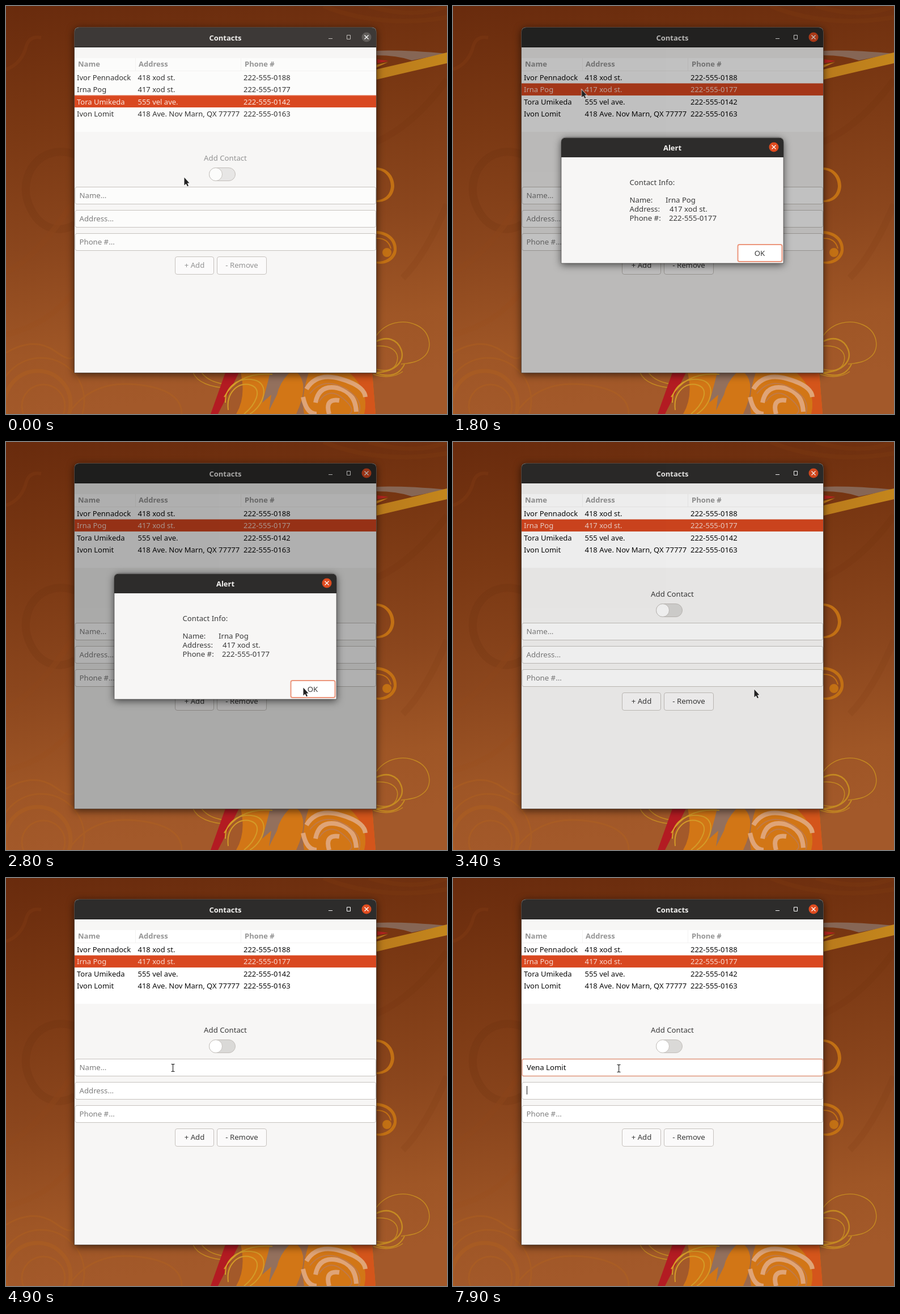
An HTML page for the animation above (8000 ms loop, 778 by 720 pixels).

```html
<!DOCTYPE html>
<html lang="en">
<head>
<meta charset="utf-8">
<title>Contacts</title>
<style>
@property --active { syntax: "<percentage>"; inherits: true; initial-value: 0%; }
@property --picked { syntax: "<percentage>"; inherits: true; initial-value: 0%; }

html, body { margin: 0; width: 100%; height: 100%; overflow: hidden; background: #83401a; }
svg { position: absolute; left: 0; top: 0; display: block; }
svg, .typed { font: 500 13.2px "Noto Sans", "Open Sans", sans-serif; }
svg text { white-space: pre; }
svg, svg *, .typed, .typed * { animation: 8s step-end infinite; }

/* window focus state */
#scene { animation-name: activate, pick; }
.bar { fill: color-mix(in srgb, #2d2c2b var(--active), #3d3937); }
.title { font-weight: 700; font-size: 13px; fill: #f3f2f0; text-anchor: middle; }
.icon { fill: none; stroke: color-mix(in srgb, #fff var(--active), #c3bfbb); }
.close { fill: color-mix(in srgb, #df4b1f var(--active), #605c59); }
.cross { stroke: #fff; stroke-width: 1.3; }
.head { font-weight: 700; font-size: 13px; fill: #959595; }
.row { font-size: 13px; fill: color-mix(in srgb, #0a0a0a var(--active), #333); }
.row.next { fill: color-mix(in srgb, #f8d9cf var(--picked), #333); }
.row.prev { fill: color-mix(in srgb, #0a0a0a var(--picked), #fbe6de); }
.label { fill: color-mix(in srgb, #3a3a3a var(--active), #939393); }
.mid { text-anchor: middle; }
.white { fill: color-mix(in srgb, #fff var(--active), #fcfcfb); }
.track { fill: color-mix(in srgb, #dad9d7 var(--active), #e7e6e5); stroke: #c2beba; }
.box { stroke: #c6c2be; }
.hint { fill: #7d7d7d; }
.select { fill: #d94820; animation-name: select; }
.dim { animation-name: dim; }

.shadow { filter: drop-shadow(0 3px 7px rgba(0, 0, 0, .6)); }
.dialog { transform-origin: 387px 343px; animation-name: dialog; animation-timing-function: linear; }
.dialog text { fill: #3a3a3a; }
.dialog .title { fill: #f3f2f0; }
.ok { fill: #fff; stroke: #ec967c; stroke-width: 2; animation-name: press; }

.name-box { animation-name: focus; animation-timing-function: linear; }
.name-hint { animation-name: hide-name; }
.addr-hint { animation-name: hide-addr; }
.pointer { animation-name: move; }
.arrow { animation-name: arrow; }
.beam { animation-name: beam; }

.typed { position: absolute; left: 130px; height: 20px; line-height: 20px; white-space: pre; color: #0a0a0a; }
.caret { display: inline-block; width: 1px; height: 15px; background: #111; vertical-align: -3px; opacity: 0; }
.name-caret { animation-name: name-caret; }
.addr-caret { animation-name: addr-caret; }

@keyframes activate {
  0%, 16.9% { --active: 0%; animation-timing-function: linear; }
  18.75%, 100% { --active: 100%; }
}
@keyframes pick { 0% { --picked: 0%; } 17.5%, 100% { --picked: 100%; } }
@keyframes select { 0% { transform: translateY(21.3px); } 17.5%, 100% { transform: none; } }
@keyframes dim {
  0%, 18.75% { opacity: 0; animation-timing-function: ease-out; }
  25% { opacity: .31; }
  40.6% { opacity: .31; animation-timing-function: linear; }
  42.5% { opacity: .07; }
  45% { opacity: .02; }
  46.25%, 100% { opacity: 0; }
}
@keyframes dialog {
  0%, 18.75% { transform: scaleY(0); opacity: 0; }
  20.6%, 40.6% { transform: none; opacity: 1; }
  42.25%, 100% { transform: scaleY(0); opacity: 0; }
}
@keyframes press { 0% { fill: #fff; } 37.5% { fill: #e0dcd8; } 38.75%, 100% { fill: #fff; } }
@keyframes focus {
  0%, 61.5% { stroke: #c6c2be; stroke-width: 1; }
  66.25%, 97.9% { stroke: #ec967c; stroke-width: 2; }
  98.75%, 100% { stroke: #e5ab97; stroke-width: 1.8; }
}
@keyframes hide-name { 0% { opacity: 1; } 62.5%, 100% { opacity: 0; } }
@keyframes hide-addr { 0% { opacity: 1; } 98.75%, 100% { opacity: 0; } }
@keyframes name-caret { 0% { opacity: 0; } 62.5% { opacity: 1; } 98.75%, 100% { opacity: 0; } }
@keyframes addr-caret { 0% { opacity: 0; } 98.75%, 100% { opacity: 1; } }
@keyframes arrow { 0% { opacity: 1; } 45%, 100% { opacity: 0; } }
@keyframes beam { 0% { opacity: 0; } 45%, 100% { opacity: 1; } }
@keyframes move {
  0% { transform: translate(314px, 302px); }
  5% { transform: translate(314px, 302px); animation-timing-function: steps(6); }
  12.5% { transform: translate(226.5px, 147px); }
  26.25% { transform: translate(226.5px, 147px); animation-timing-function: steps(7); }
  35% { transform: translate(524px, 433px); }
  42.5% { transform: translate(531px, 436px); }
  45% { transform: translate(430px, 406px); }
  46.25% { transform: translate(365px, 366px); }
  48.75% { transform: translate(326px, 338px); }
  50% { transform: translate(312px, 324px); }
  61.25% { transform: translate(294.5px, 335px); }
  62.5%, 100% { transform: translate(292.5px, 336px); }
}

/* one rule per keystroke */
@keyframes k1 { 0% { font-size: 0; } 75%, 100% { font-size: 13.2px; } }
@keyframes k2 { 0% { font-size: 0; } 81.25%, 100% { font-size: 13.2px; } }
@keyframes k3 { 0% { font-size: 0; } 83.75%, 100% { font-size: 13.2px; } }
@keyframes k4 { 0% { font-size: 0; } 87.5%, 100% { font-size: 13.2px; } }
@keyframes k5 { 0% { font-size: 0; } 91.25%, 100% { font-size: 13.2px; } }
@keyframes k6 { 0% { font-size: 0; } 92.5%, 100% { font-size: 13.2px; } }
@keyframes k7 { 0% { font-size: 0; } 95%, 100% { font-size: 13.2px; } }
@keyframes k8 { 0% { font-size: 0; } 96.25%, 100% { font-size: 13.2px; } }
</style>
</head>
<body>
<svg id="scene" width="778" height="720" viewBox="0 0 778 720">
  <defs>
    <linearGradient id="sky" x2="0.12" y2="1">
      <stop offset="0" stop-color="#692b0d"/>
      <stop offset=".3" stop-color="#7a3813"/>
      <stop offset=".6" stop-color="#8b461d"/>
      <stop offset=".85" stop-color="#9f5626"/>
      <stop offset="1" stop-color="#a3592a"/>
    </linearGradient>
    <linearGradient id="band" x2="1" y2="0">
      <stop offset="0" stop-color="#b97a1c"/>
      <stop offset="1" stop-color="#c4861c"/>
    </linearGradient>
  </defs>

  <!-- wallpaper -->
  <rect width="778" height="720" fill="url(#sky)"/>
  <g fill="none" stroke="#a9571f" opacity=".13">
    <path d="M0 112Q28 102 36 70Q42 52 62 56" stroke-width="6"/>
    <path d="M122 262C60 240 20 300 40 350S100 400 122 385" stroke="#5e260c" stroke-width="14"/>
    <path d="M0 470Q60 440 122 340M0 580Q80 560 122 500" stroke-width="10" opacity=".5"/>
    <path d="M560 0Q660 40 778 20M640 0Q720 24 778 0" stroke-width="8" opacity=".7"/>
    <path d="M653 240Q720 210 778 130M700 480Q740 440 778 350" stroke="#5e260c" stroke-width="12" opacity=".5"/>
  </g>
  <g fill="none" stroke="#b5651f" opacity=".36">
    <circle cx="62" cy="697" r="76" stroke-width="3"/>
    <circle cx="56" cy="702" r="58" stroke-width="7"/>
    <circle cx="66" cy="706" r="38" stroke-width="3"/>
    <path d="M0 612Q50 582 88 610T121 600M110 720Q150 660 230 668T310 720" stroke-width="3"/>
  </g>
  <path d="M653 79Q700 77 778 84L716 96Q690 87 653 87Z" fill="#866655"/>
  <path d="M655 94L675 97L655 101Z" fill="#b32420"/>
  <path d="M653 104L674 99L653 109Z" fill="#c07a1c"/>
  <path d="M653 112Q715 98 778 82V101Q720 114 653 130Z" fill="url(#band)"/>
  <g fill="#c27014">
    <path d="M653 285C675 286 685 302 685 318C684 336 671 347 653 346V343C668 342 678 333 679 318C679 304 670 290 653 289Z"/>
    <path d="M653 397C677 398 691 413 689 432C687 448 670 458 653 454V451C668 452 682 444 684 430C684 414 672 403 653 402Z"/>
    <circle cx="672" cy="435" r="8"/>
  </g>
  <path d="M653 410Q674 409 679 428" fill="none" stroke="#c27014" stroke-width="2"/>
  <g fill="none" stroke="#c58a22" stroke-width="1.4">
    <path d="M653 582C670 558 700 552 724 563C750 575 753 606 737 619C725 630 710 630 697 632"/>
    <path d="M653 592C672 582 690 588 697 606C704 625 690 645 653 647" stroke-width="2.5"/>
    <path d="M653 600C680 598 694 610 690 627S668 645 653 641"/>
    <path d="M653 648Q690 660 703 632" stroke-width="2"/>
    <path d="M330 647C337 664 361 673 390 674M345 647Q360 667 398 668M648 650Q680 660 700 645"/>
  </g>
  <path d="M387 647H411L374 720H361Z" fill="#b31b22"/>
  <path d="M414 647H646L652 720H406Q424 690 414 647Z" fill="#d27616"/>
  <path d="M466 647H500Q482 666 478 686L464 714L468 686L452 700Q460 672 466 647Z" fill="#93705d"/>
  <path d="M606 647H646L652 720H632Q642 680 606 647Z" fill="#d4551b"/>
  <path d="M514 647Q536 668 512 720H526Q520 690 534 647Z" fill="#9c6a4c"/>
  <g fill="none" stroke="#dfa477" stroke-width="8">
    <path d="M530 676Q548 646 590 658T634 690M524 690Q530 720 548 720"/>
    <path d="M546 700Q552 668 584 674T618 716M570 720Q562 692 588 696"/>
  </g>
  <g fill="none" stroke="#c07a48" stroke-width="2">
    <path d="M536 684Q560 654 596 674T622 720M552 698Q570 672 594 692T606 720"/>
  </g>
  <g fill="none" stroke="#d49b28" stroke-width="2">
    <path d="M387 700C386 672 410 654 438 660S456 705 430 720M392 713C388 682 410 662 432 669S440 704 420 720"/>
    <path d="M385 690Q410 645 470 650"/>
  </g>

  <!-- main window -->
  <path class="shadow" d="M120.500 647.500V46Q120.500 37.500 129 37.500H645Q653.500 37.500 653.500 46V647.500Z" fill="#f6f5f4" stroke="#2a1a10" stroke-opacity=".6"/>
  <path d="M121 73H653V647H121Z" fill="#f7f6f5"/>
  <path class="bar" d="M121 73V46Q121 38 129 38H645Q653 38 653 46V73Z"/>
  <path d="M121 72.500H653" stroke="#1d1c1b"/>
  <text class="title" x="387" y="60.500">Contacts</text>
  <path class="icon" d="M569 57.500H576M601.500 51.500H607.500V58.500H601.500Z"/>
  <circle class="close" cx="636" cy="55" r="8.500"/>
  <path class="cross" d="M632.500 51.500L639.500 58.500M639.500 51.500L632.500 58.500"/>

  <rect class="white" x="121" y="92" width="532" height="130"/>
  <path d="M228.500 92V114M414.500 92V114M121 114.500H653" stroke="#f3f2f1"/>
  <text class="head" y="107"><tspan x="127">Name</tspan><tspan x="234">Address</tspan><tspan x="421">Phone #</tspan></text>
  <rect class="select" x="121" y="136.500" width="532" height="21.400"/>
  <text class="row" y="130.500"><tspan x="125">Ivor Pennadock</tspan><tspan x="232.500">418 xod st.</tspan><tspan x="419">222-555-0188</tspan></text>
  <text class="row next" y="152"><tspan x="125">Irna Pog</tspan><tspan x="232.500">417 xod st.</tspan><tspan x="419">222-555-0177</tspan></text>
  <text class="row prev" y="173.500"><tspan x="125">Tora Umikeda</tspan><tspan x="232.500">555 vel ave.</tspan><tspan x="419">222-555-0142</tspan></text>
  <text class="row" y="195"><tspan x="125">Ivon Lomit</tspan><tspan x="232.500">418 Ave. Nov Marn, QX 77777</tspan><tspan x="419">222-555-0163</tspan></text>

  <text class="label mid" x="387" y="272.500">Add Contact</text>
  <rect class="track" x="358.500" y="285.500" width="46" height="23" rx="11.500"/>
  <circle class="white box" cx="370" cy="297" r="11.500"/>

  <rect class="white box name-box" x="122" y="319.500" width="530.500" height="30" rx="3"/>
  <rect class="white box" x="122" y="360.500" width="530.500" height="30" rx="3"/>
  <rect class="white box" x="122" y="401.500" width="530.500" height="30" rx="3"/>
  <text class="hint name-hint" x="129.500" y="339">Name...</text>
  <text class="hint addr-hint" x="129.500" y="380">Address...</text>
  <text class="hint" x="129.500" y="421">Phone #...</text>

  <rect class="box" x="298.500" y="442.500" width="68" height="31" rx="3.500" fill="#fbfafa"/>
  <rect class="box" x="372.500" y="442.500" width="87" height="31" rx="3.500" fill="#fbfafa"/>
  <text class="label mid" x="332.500" y="462">+ Add</text>
  <text class="label mid" x="416" y="462">- Remove</text>
  <path class="dim" d="M121 647V46Q121 38 129 38H645Q653 38 653 46V647Z" opacity="0"/>

  <!-- alert -->
  <g class="dialog">
    <path class="shadow" d="M191 454V240Q191 232 199 232H575Q583 232 583 240V454Z" fill="#f7f6f5" stroke="#2a2725" stroke-opacity=".5"/>
    <path d="M191 267V240Q191 232.500 199 232.500H575Q583 232.500 583 240V267Z" fill="#2d2c2b"/>
    <text class="title" x="387" y="254.500">Alert</text>
    <circle cx="566" cy="249" r="8.500" fill="#df4b1f"/>
    <path class="cross" d="M562.500 245.500L569.500 252.500M569.500 245.500L562.500 252.500"/>
    <text x="311.500" y="315.500">Contact Info:</text>
    <text y="346.500"><tspan x="311.500">Name:</tspan><tspan x="375">Irna Pog</tspan></text>
    <text y="362.500"><tspan x="311.500">Address:</tspan><tspan x="382">417 xod st.</tspan></text>
    <text y="378.500"><tspan x="311.500">Phone #:</tspan><tspan x="381">222-555-0177</tspan></text>
    <rect class="ok" x="502.500" y="421" width="78" height="30" rx="3"/>
    <text class="mid" x="541" y="441">OK</text>
  </g>

  <g class="pointer">
    <path class="arrow" d="M0.500 0.500V14.500L3.600 11.500L6 16.300L8 15.300L5.700 10.600H9.500Z" fill="#222" stroke="#fff" stroke-width="1.600" stroke-opacity=".85" paint-order="stroke"/>
    <g class="beam" fill="none">
      <path d="M-3 -6.500H3M-3 6.500H3M0 -6.500V6.500" stroke="#fff" stroke-width="3"/>
      <path d="M-3 -6.500H-1L0 -5.500L1 -6.500H3M-3 6.500H-1L0 5.500L1 6.500H3M0 -5.500V5.500" stroke="#1c1c1c" stroke-width="1.200"/>
    </g>
  </g>
</svg>

<div class="typed" style="top:324px"><span style="animation-name:k1">V</span><span style="animation-name:k2">e</span><span style="animation-name:k3">n</span><span style="animation-name:k4">a</span><span style="animation-name:k5"> L</span><span style="animation-name:k6">o</span><span style="animation-name:k7">m</span><span style="animation-name:k8">it</span><i class="caret name-caret"></i></div>
<div class="typed" style="top:364px"><i class="caret addr-caret"></i></div>
</body>
</html>
```
